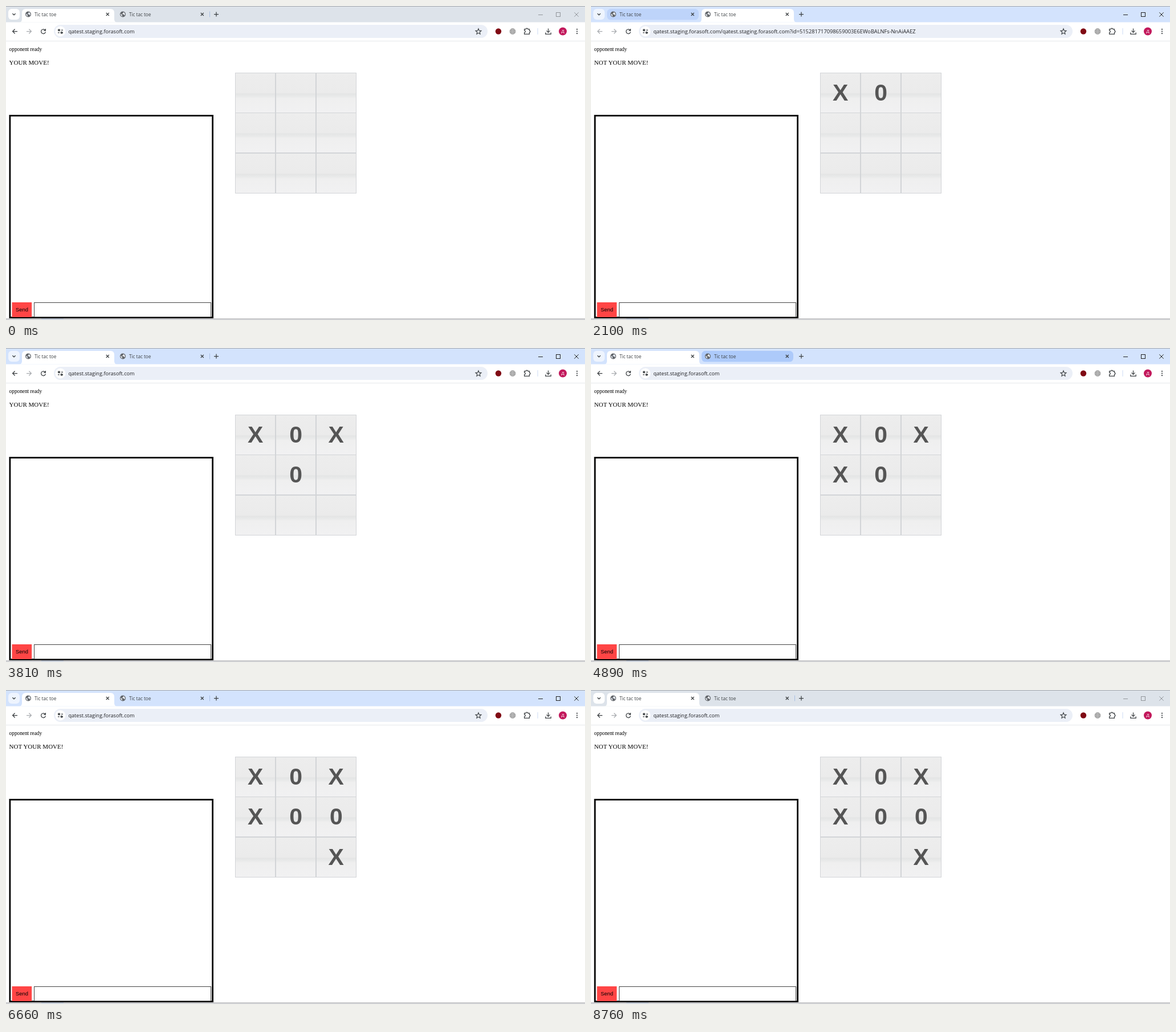
Write an HTML page that moves like this. It is 1016x551 px and loops after 8.79 s.

```html
<!DOCTYPE html>
<html lang="en">
<head>
<meta charset="utf-8">
<title>Tic tac toe</title>
<style>
  html, body { margin: 0; width: 100%; height: 100%; overflow: hidden; background: #fff; }
  svg { display: block; width: 1016px; height: 551px; }
  .ui { font-family: "Open Sans", "Noto Sans", sans-serif; fill: #202124; }
  .tab-title { font-size: 8.15px; fill: #3c4043; }
  .page { font-family: "Liberation Serif", serif; fill: #000; }
  .mark { font: bold 41px "Liberation Sans", Arial, sans-serif; fill: #555; text-anchor: middle; }
  .line { fill: none; stroke: #3c4043; stroke-width: 1.25; }
  #strip { fill: #d3e3fd; }
  #menu { fill: #eef4fe; }
  #controls { stroke: #222; stroke-width: 1; }
  .inactive #strip { fill: #dde3ea; }
  .inactive #menu { fill: #fff; }
  .inactive #controls { stroke: #92969b; }
</style>
</head>
<body>
<svg id="stage" viewBox="0 0 1016 551" xmlns="http://www.w3.org/2000/svg">
  <defs>
    <linearGradient id="shade" x2="0" y2="1">
      <stop offset="0" stop-color="#ededed"/>
      <stop offset=".5" stop-color="#ebebeb"/>
      <stop offset=".52" stop-color="#e4e5e5"/>
      <stop offset=".58" stop-color="#e8e9e9"/>
      <stop offset=".64" stop-color="#efefef"/>
      <stop offset="1" stop-color="#f1f1f2"/>
    </linearGradient>
    <g id="globe">
      <circle r="5" fill="#5f6368"/>
      <path d="M-3.9-1.2 L-1.4 1 V2.2 L-.3 3.8 C-2.6 3.8-4.1 1.6-3.9-1.2Z M.2-3.9 C2.4-3.6 3.8-1.8 3.9.2 L3.2 2 L2.2 1.6 V.2 L-1.2-.2 V-1.3 H.2 V-2.4 H1.2Z" fill="#eef2f8"/>
    </g>
    <path id="cross" d="M-2.5-2.5 L2.5 2.5 M2.5-2.5 L-2.5 2.5" class="line" stroke-width="1.2"/>
    <path id="tabShape" d="M-5 28.5 Q0 28.5 0 23 V12 Q0 5 7 5 H155 Q162 5 162 12 V23 Q162 28.5 167 28.5Z" fill="#fff"/>
  </defs>

  <rect width="1016" height="551" fill="#fff"/>
  <rect id="strip" width="1016" height="28.5"/>
  <rect width="1016" height="1" fill="#a3a7ac"/>
  <rect id="menu" x="4" y="5" width="20" height="19" rx="6"/>
  <path d="M11.4 13.2 L14 15.8 L16.6 13.2" class="line"/>

  <rect id="hover" y="5" width="161" height="19.3" rx="6.5"/>
  <use id="active" href="#tabShape"/>
  <g id="tabs" class="ui tab-title"></g>
  <rect id="divider" x="357" y="9.5" width="1" height="10" fill="#a8bfe3"/>
  <path d="M365 14.5 H373 M369 10.5 V18.5" class="line"/>
  <g id="controls" fill="none">
    <path d="M934 15.5 H942"/>
    <rect x="965.5" y="11.5" width="7" height="7"/>
    <path d="M997.3 11.3 L1004.7 18.7 M1004.7 11.3 L997.3 18.7"/>
  </g>

  <!-- toolbar -->
  <path id="back" d="M20 44.5 H11.8 M15.6 40.5 L11.6 44.5 L15.6 48.5" class="line"/>
  <path d="M36 44.5 H44.2 M40.4 40.5 L44.4 44.5 L40.4 48.5" class="line" style="stroke:#a9acb0"/>
  <path d="M68.8 42.5 A3.9 3.9 0 1 0 69.4 45.3 M69.4 40 V43.2 H66.2" class="line"/>
  <rect x="84" y="33" width="761" height="23" rx="11.5" fill="#ebeff7"/>
  <circle cx="95.4" cy="44.5" r="9" fill="#fff"/>
  <path d="M91 42.3 H94 M96.8 42.3 H100 M91 46.8 H93.8 M96.4 46.8 H100" class="line"/>
  <circle cx="98.4" cy="42.3" r="1.5" class="line" transform="translate(-5.4)"/>
  <circle cx="97.6" cy="46.8" r="1.5" class="line"/>
  <text id="url" class="ui" x="109.4" y="48.2"></text>
  <path id="star" class="line" style="stroke-width:1.1"/>
  <circle cx="864" cy="44.5" r="5.2" fill="#800a14"/>
  <circle cx="889" cy="44.5" r="5.4" fill="#a2a2a2"/>
  <path d="M884 44.5 H894 M885 41.8 H893 M885 47.2 H893 M889 39.5 V49.5" fill="none" stroke="#c9c9c9" stroke-width=".7"/>
  <path d="M909.6 40.6 H912.4 A1.6 1.6 0 0 1 915.6 40.6 H918.4 V43.2 A1.6 1.6 0 0 1 918.4 46.4 V49.4 H909.6 V46.6 A1.8 1.8 0 0 0 909.6 43Z" class="line"/>
  <rect x="932.5" y="39" width="1" height="11" fill="#cddcf5"/>
  <path d="M951.5 39.5 V46 M948.5 43.4 L951.5 46.4 L954.5 43.4 M946.8 46.5 V49.3 H956.2 V46.5" class="line"/>
  <circle cx="977" cy="44.5" r="7" fill="#c2185b"/>
  <text class="ui" x="977" y="47.3" font-size="8" text-anchor="middle" style="fill:#fff">Д</text>
  <g fill="#3c4043"><circle cx="1002" cy="40.8" r="1.1"/><circle cx="1002" cy="44.5" r="1.1"/><circle cx="1002" cy="48.2" r="1.1"/></g>
  <rect y="61" width="1016" height="1" fill="#e6e8eb"/>

  <!-- page -->
  <text class="page" x="5.6" y="79.2" font-size="9.29">opponent ready</text>
  <text id="status" class="page" x="5.6" y="103" font-size="11.03"></text>
  <g id="board"></g>

  <rect y="548.4" width="1016" height="1.6" fill="#b6b7ba"/>
  <rect y="550" width="1016" height="1" fill="#e3e4e6"/>
  <rect x="62" y="548.4" width="39" height="1.6" fill="#a9b4c4"/>
  <rect x="6.9" y="192.4" width="355.7" height="354.2" fill="#fff" stroke="#000" stroke-width="2.8"/>
  <rect x="10.5" y="520" width="34.7" height="26" fill="#ff4545"/>
  <text x="17" y="536" font-size="9.4" font-family="Liberation Sans, Arial, sans-serif">Send</text>
  <rect x="49.5" y="520.5" width="310" height="25.3" fill="#fff" stroke="#444" stroke-width="1"/>
  <rect id="focus" x="49.9" y="520.9" width="309.3" height="25" rx="1.5" fill="none" stroke="#000" stroke-width="1.9"/>
  <rect id="caret" x="58" y="527.5" width="1" height="11" fill="#000"/>
</svg>

<script>
const LOOP = 8790;
const LIGHT = '#bed4fa', DARK = '#adcafa';
const HOST = 'qatest.staging.forasoft.com';
const URLS = [HOST, `${HOST}/${HOST}?id=515281717098659003E6EWoBALNFs-NnAiAAEZ`];
const URL_SIZES = [9.14, 9.28];
const TAB_X = [28, 194];
const MOVES = [0, 1, 2, 4, 3, 5, 8];   // cells in playing order, X first

const START = { windowOn: false, tab: 0, marks: 0, hover: '', focus: false, caret: false };
const pick = tab => ({ tab, hover: '' });
const EVENTS = [
  [660, { windowOn: true }],
  [690, { marks: 1 }],
  [1350, { hover: LIGHT }], [1380, { hover: DARK }], [1620, pick(1)],
  [1890, { marks: 2 }],
  [2100, { hover: LIGHT }], [2130, { hover: DARK }], [2160, pick(0)],
  [2550, { marks: 3 }],
  [2700, { hover: LIGHT }], [2730, { hover: DARK }], [2850, pick(1)],
  [3300, { marks: 4 }],
  [3600, { hover: LIGHT }], [3630, { hover: DARK }], [3810, pick(0)],
  [4560, { marks: 5 }],
  [4860, { hover: LIGHT }], [4890, { hover: DARK }], [5010, pick(1)],
  [5550, { marks: 6 }],
  [5910, { hover: LIGHT }], [5940, { hover: DARK }], [6090, pick(0)],
  [6660, { marks: 7 }],
  [7350, { focus: true, caret: true }],
  [7500, { caret: false }],
  [7740, { focus: false }],
  [8760, { windowOn: false }],
];

const $ = id => document.getElementById(id);
const show = (node, on) => node.setAttribute('visibility', on ? 'visible' : 'hidden');

function build() {
  $('tabs').innerHTML = TAB_X.map(x => `
    <use href="#globe" x="${x + 11}" y="14.5"/>
    <text x="${x + 22}" y="17.6">Tic tac toe</text>
    <use href="#cross" x="${x + 150.3}" y="14.5"/>`).join('');

  const step = 70.75;
  const cells = Array.from({ length: 9 }, (_, i) => {
    const x = 402.5 + Math.round(i % 3 * step), y = 117.5 + Math.round(Math.floor(i / 3) * step - .3);
    return `<rect x="${x}" y="${y}" width="70" height="70" fill="url(#shade)" stroke="#d2d4d7"/>`;
  });
  const marks = MOVES.map((cell, i) =>
    `<text class="mark" x="${437.8 + cell % 3 * step}" y="${165.7 + Math.floor(cell / 3) * step}">${i % 2 ? '0' : 'X'}</text>`);
  $('board').innerHTML = cells.join('') + marks.join('');

  const points = Array.from({ length: 10 }, (_, i) => {
    const angle = i * Math.PI / 5 - Math.PI / 2, r = i % 2 ? 2.3 : 5.2;
    return `${829 + r * Math.cos(angle)} ${45 + r * Math.sin(angle)}`;
  });
  $('star').setAttribute('d', `M${points.join('L')}Z`);
}

function render({ windowOn, tab, marks, hover, focus, caret }) {
  $('stage').classList.toggle('inactive', !windowOn);
  $('active').setAttribute('x', TAB_X[tab]);
  $('hover').setAttribute('x', TAB_X[1 - tab]);
  $('hover').setAttribute('fill', hover || 'none');
  show($('divider'), tab === 0 && !hover);
  $('back').style.stroke = tab ? '#a9acb0' : '';
  $('url').textContent = URLS[tab];
  $('url').setAttribute('font-size', URL_SIZES[tab]);
  $('status').textContent = marks % 2 === tab ? 'YOUR MOVE!' : 'NOT YOUR MOVE!';
  document.querySelectorAll('.mark').forEach((mark, i) => show(mark, i < marks));
  show($('focus'), focus);
  show($('caret'), caret);
}

let shown = -1;
function tick() {
  const time = performance.now() % LOOP;
  const past = EVENTS.filter(([at]) => at <= time);
  if (past.length !== shown) {
    shown = past.length;
    render(Object.assign({}, START, ...past.map(([, change]) => change)));
  }
  requestAnimationFrame(tick);
}

build();
tick();
</script>
</body>
</html>
```
